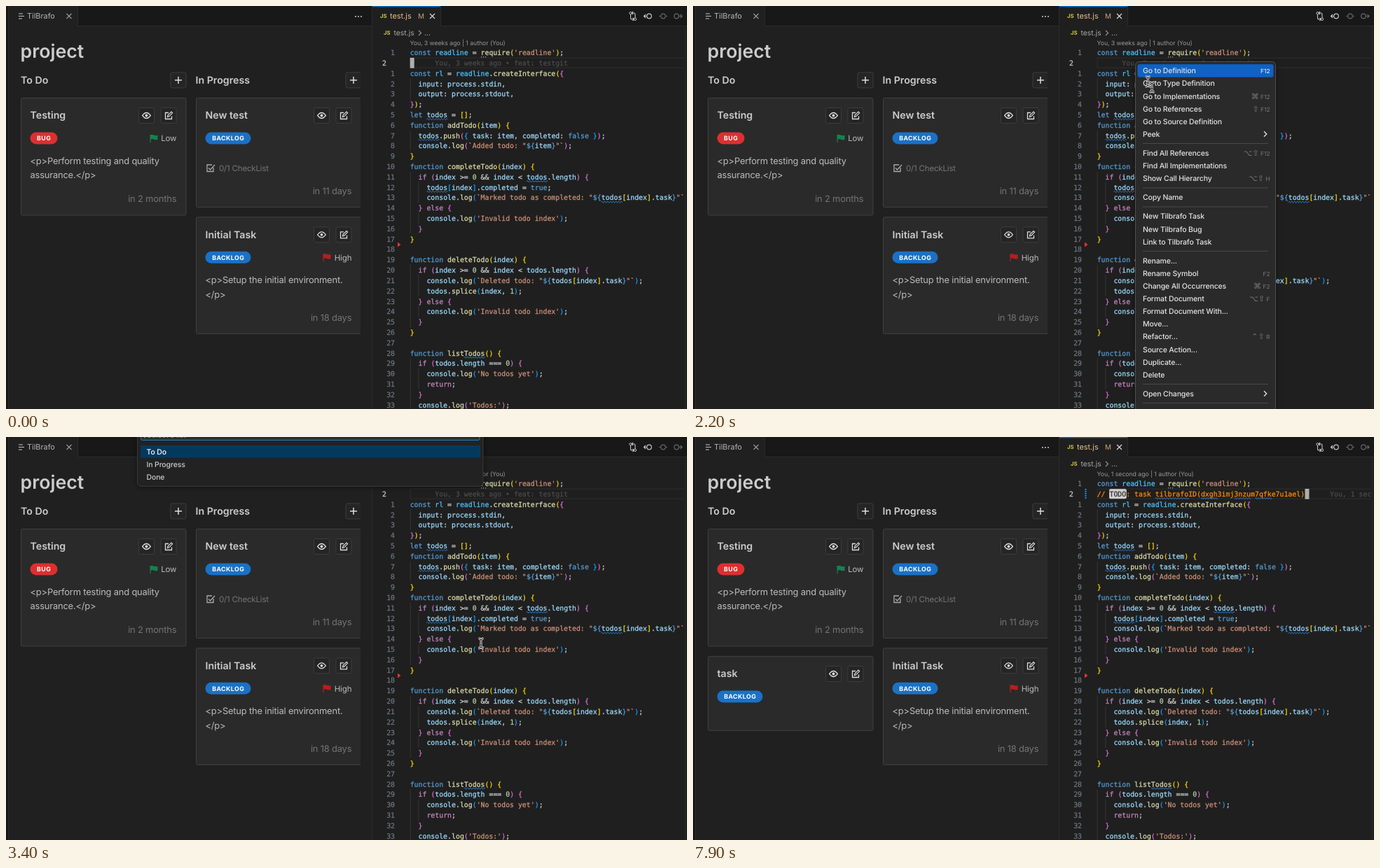
An HTML page for the animation above (8000 ms loop, 972x576 px).

```html
<!DOCTYPE html>
<html lang="en">
<head>
<meta charset="utf-8">
<title>Task board and editor</title>
<style>
html, body { margin: 0; width: 100%; height: 100%; overflow: hidden; background: #1f1f1f; }
svg { display: block; width: 972px; height: 576px; font-family: Inter, "Open Sans", sans-serif; text-rendering: geometricPrecision; }
.mono { font-family: "DejaVu Sans Mono", "Liberation Mono", monospace; font-variant-ligatures: none; }
.keys { font-family: Inter, "DejaVu Sans", sans-serif; }
.keys tspan { font-family: "DejaVu Sans", sans-serif; font-size: 11px; }
</style>
</head>
<body>
<svg id="stage" viewBox="0 0 972 576"></svg>
<script type="text/plain" id="code">const readline = require('readline');

const rl = readline.createInterface({
  input: process.stdin,
  output: process.stdout,
});
let todos = [];
function addTodo(item) {
  todos.push({ task: item, completed: false });
  console.log(`Added todo: "${item}"`);
}
function completeTodo(index) {
  if (index >= 0 && index < todos.length) {
    todos[index].completed = true;
    console.log(`Marked todo as completed: "${todos[index].task}"`);
  } else {
    console.log('Invalid todo index');
  }
}

function deleteTodo(index) {
  if (index >= 0 && index < todos.length) {
    console.log(`Deleted todo: "${todos[index].task}"`);
    todos.splice(index, 1);
  } else {
    console.log('Invalid todo index');
  }
}

function listTodos() {
  if (todos.length === 0) {
    console.log('No todos yet');
    return;
  }
  console.log('Todos:');</script>
<script>
const DUR = 8000;
const AT = { menu: 1400, menuEnd: 3000, picker: 3200, input: 4600, type: 6100, close: 7000, insert: 7100, card: 7300 };
const APP = 'TilBrafo', App = 'Tilbrafo';
const X0 = 576.7, CW = 5.935, LH = 14.81, BASE = 70.1;
const col = c => X0 + c * CW;
const row = r => BASE + r * LH;

const esc = s => s.replace(/&/g, '&amp;').replace(/</g, '&lt;');
const text = (x, y, s, size, fill, more = '') =>
  `<text x="${x}" y="${y}" font-size="${size}" fill="${fill}" ${more}>${esc(s)}</text>`;
const rect = (x, y, w, h, fill, more = '') =>
  `<rect x="${x}" y="${y}" width="${w}" height="${h}" fill="${fill}" ${more}/>`;
const line = (d, color, width = 1, more = '') =>
  `<path d="${d}" fill="none" stroke="${color}" stroke-width="${width}" ${more}/>`;
const group = (id, body) => `<g id="${id}">${body}</g>`;
const mono = (x, y, s, fill, more = '') =>
  text(x, y, s, 9.86, fill, `class="mono" stroke="${fill}" stroke-width=".25" xml:space="preserve" ${more}`);
const ui = (x, y, s, fill, more = '') =>
  text(x, y, s, 10.5, fill, `font-weight="500" letter-spacing="-.14" ${more}`);
const cross = (x, y, color) => line(`M${x - 3.5} ${y - 3.5}l7 7m0 -7l-7 7`, color, 1.1);
const END = 'text-anchor="end"', BOLD = 'font-weight="600"';

// ---- board ----
function iconButton(x, y, icon) {
  return rect(x + .5, y + .5, 22, 22, '#252525', 'rx="2" stroke="#3c3c3c"') +
    `<g transform="translate(${x + 11.5} ${y + 11.5})">${icon}</g>`;
}
const plus = line('M-5 0h10M0 -5v10', '#ddd', 1.5);
const eye = line('M-5.8 0Q0 -8 5.8 0Q0 8 -5.8 0Z', '#ddd', 1.3) + '<circle r="1.9" fill="#ddd"/>';
const pen = line('M0 -4H-4.5V5H4.5V1', '#ddd', 1.3) +
  line('M-1.5 2l.6 -2.4L4 -5.3l1.6 1.6L.8 1.3Z', '#ddd', 1.2);

function pill(x, y, s, w, color) {
  return rect(x, y, w, 17, color, 'rx="8.5"') +
    text(x + w / 2 + .2, y + 11.7, s, 8.8, '#fff', 'font-weight="700" letter-spacing=".45" text-anchor="middle"');
}
function card(x, y, h, title, o) {
  const body = (s, i) => text(x + 13.5, y + 94.8 + i * 20.5, s, 12.9, '#bcbcbc', 'letter-spacing="-.18"');
  let s = rect(x + .5, y + .5, 235.5, h - 1, '#2a2a2a', 'rx="2" stroke="#404040"') +
    text(x + 13.5, y + 30.2, title, 14.2, '#cccccc', BOLD) +
    iconButton(x + 168, y + 14, eye) + iconButton(x + 199.5, y + 14, pen) +
    (o.bug ? pill(x + 13.5, y + 49.5, 'BUG', 39, '#dc3030') : pill(x + 13.5, y + 49.5, 'BACKLOG', 65, '#1b71c4'));
  if (o.level) {
    s += text(x + 222.3, y + 62.4, o.level, 11.5, '#bcbcbc', `letter-spacing="-.15" ${END}`);
    const fx = o.level === 'Low' ? x + 184.5 : x + 181.5;
    s += `<path d="M${fx} ${y + 53}h5l.8 1h5.2v6.3h-5l-.8 -1h-4v4.7h-1.2z" fill="${o.flag}"/>`;
  }
  if (o.check) {
    s += line(`M${x + 25} ${y + 100}v5.5h-9v-9.5h7m-5 4.5l2.5 2.5l6.5 -7`, '#aaa', 1.3) +
      text(x + 33, y + 105.2, o.check, 11.5, '#757575', 'letter-spacing="-.18"');
  }
  (o.body || []).forEach((b, i) => s += body(b, i));
  if (o.due) s += text(x + 222.3, y + h - 19.5, o.due, 12.9, '#747474', `letter-spacing="-.18" ${END}`);
  return s;
}

function board() {
  return rect(0, 0, 523, 576, '#202020') + rect(0, 0, 523, 28, '#181818') + rect(0, 0, 3.5, 576, '#181818') +
    rect(4, 0, 98, 29, '#202020') +
    line('M3.5 0V576M102.5 0V28.5H523', '#2b2b2b') +
    line('M18 11h6M18 14.5h8M18 18h5', '#c5c5c5', 1.2) +
    text(30, 18, APP, 10.9, '#b4b4b4') + cross(90, 14.5, '#9a9a9a') +
    [499, 503, 507].map(x => `<circle cx="${x}" cy="15" r="1" fill="#ccc"/>`).join('') +
    text(20.5, 74, 'project', 26.7, '#cccccc', BOLD) +
    text(21, 111, 'To Do', 14.2, '#cccccc', BOLD) + iconButton(234.5, 94.5, plus) +
    text(270.5, 111, 'In Progress', 14.2, '#cccccc', BOLD) +
    card(21, 131, 168.5, 'Testing', { bug: 1, level: 'Low', flag: '#15824f',
      body: ['<p>Perform testing and quality', 'assurance.</p>'], due: 'in 2 months' }) +
    group('newCard', card(21, 313, 107, 'task', {})) +
    '<g clip-path="url(#boardClip)">' + iconButton(484.5, 94.5, plus) +
    card(271, 131, 157, 'New test', { check: '0/1 CheckList', due: 'in 11 days' }) +
    card(271, 301.3, 167.7, 'Initial Task', { level: 'High', flag: '#b81e1e',
      body: ['<p>Setup the initial environment.', '</p>'], due: 'in 18 days' }) + '</g>';
}

// ---- editor ----
const BRACKETS = ['#ffd700', '#da70d6', '#179fff'];
let depth = 0;
function tokenColor(tok, rest) {
  if (tok === '${' || (tok === '}' && rest.startsWith('"`'))) return '#569cd6';
  if (/^['`"]/.test(tok)) return '#ce9178';
  if (/^[([{]$/.test(tok)) return BRACKETS[depth++ % 3];
  if (/^[)\]}]$/.test(tok)) return BRACKETS[--depth % 3];
  if (/^(const|let|function|true|false)$/.test(tok)) return '#569cd6';
  if (/^(if|else|return)$/.test(tok)) return '#c586c0';
  if (/^\d/.test(tok)) return '#b5cea8';
  if (/^(readline|rl)$/.test(tok)) return '#4fc1ff';
  if (/^\w/.test(tok)) return rest[0] === '(' ? '#dcdcaa' : '#9cdcfe';
  return '#d4d4d4';
}
function codeLine(src, r) {
  const re = /'[^']*'|`[^$]*|"`|\$\{|\}(?="`)|\w+|[()[\]{}]|[^\w'`"$()[\]{}]+/g;
  let s = '', m;
  const indent = src.match(/^ */)[0].length;
  for (let c = 0; c < indent; c += 2) s += rect(col(c), row(r) - 11, .8, LH, '#3d3d3d');
  while ((m = re.exec(src))) {
    const tok = m[0], color = tokenColor(tok, src.slice(re.lastIndex));
    const lead = tok.match(/^ */)[0].length;
    if (tok.trim()) s += mono(col(m.index + lead), row(r), tok.trim(), color);
  }
  return s;
}
const squiggle = (r, c, n) =>
  line(`M${col(c)} ${row(r) + 2.8}q1 -1.8 2 0` + 't2 0'.repeat(Math.round(n * CW / 2) - 1), '#3794ff', .9);
const js = (x, y) => text(x, y, 'JS', 7.8, '#cbcb41', 'font-weight="700"');
const ring = (x, y, r, color, width = 1) =>
  `<circle cx="${x}" cy="${y}" r="${r}" fill="none" stroke="${color}" stroke-width="${width}"/>`;
const node = (x, color, d) => ring(x, 14.5, 3.3, color, 1.2) + line(d, color, 1.2);

function editor() {
  const rows = document.getElementById('code').textContent.split('\n');
  let s = rect(523, 0, 449, 576, '#1f1f1f') + rect(523, 0, 449, 28, '#181818') + rect(523, 0, 97, 29, '#1f1f1f') +
    line('M522.5 0V576M620.5 0V28.5H972', '#2b2b2b') + rect(523, 0, 97, 1.3, '#0078d4') +
    js(534, 17.3) + text(548, 18.2, 'test.js', 10.9, '#e2c08d') + text(588, 18, 'M', 10, '#c5a577') +
    cross(608.5, 14.5, '#ddd') +
    line('M891.5 12V17q0 2 2 2h3m-2 -2l2 2l-2 2M898 17V12q0 -2 -2 -2h-3m2 -2l-2 2l2 2', '#c5c5c5', 1.1) +
    ring(891.5, 10.3, 1.7, '#c5c5c5') + ring(898, 18.8, 1.7, '#c5c5c5') +
    node(918, '#c5c5c5', 'M914.5 14.5h-4m2.5 -2.5l-2.5 2.5l2.5 2.5') +
    node(938, '#666', 'M932 14.5h2.5m7 0h2.5') +
    node(957, '#666', 'M960.5 14.5h4.5m-2.5 -2.5l2.5 2.5l-2.5 2.5') +
    js(539, 41.2) + text(553.5, 42, 'test.js', 10.4, '#a8a8a8') +
    line('M589 35l3.5 3.5l-3.5 3.5', '#999', 1.1) + text(597, 42, '...', 10.4, '#a8a8a8') +
    '<text id="lens" x="576.5" y="56.2" font-size="8.7" fill="#999" letter-spacing="-.03"></text>';
  s += '<g clip-path="url(#codeClip)">' +
    rect(577, 74.3, 400, 14, 'none', 'stroke="#2b2b2b" stroke-width="1.3"');
  rows.forEach((src, r) => {
    s += codeLine(src, r);
    s += r === 1 ? mono(537, row(r), '2', '#cccccc')
      : mono(555, row(r), String(r ? r - 1 : 1), '#6e7681', END);
  });
  [[6, 4], [8, 2], [12, 28], [13, 4], [14, 46], [29, 13]].forEach(([r, c]) => s += squiggle(r, c, 5));
  s += [0, 3, 6].map(d => rect(678 + d, 72.3, 1.2, 1.2, '#aaa')).join('') +
    '<path d="M559 337.5l4.5 3.5l-4.5 3.5z" fill="#e5352b"/>' +
    group('oldBlame', mono(col(6), row(1), 'You, 3 weeks ago • feat: testgit', '#4b4b4b')) +
    group('note',
      mono(col(0), row(1), '//', '#ff8c00') + rect(col(3) - .5, 74.3, 4 * CW + 1, 14, '#d0d0d0', 'rx="2"') +
      mono(col(3), row(1), 'TODO', '#333') +
      mono(col(7), row(1), `: task ${App.toLowerCase()}ID(dxgh3imj3nzum7qfke7u1ael)`, '#ff8c00') +
      [[14, 8], [25, 4], [33, 4], [38, 4]].map(([c, n]) => squiggle(1, c, n)).join('') +
      line('M560.5 74V89', '#2090d3', 2, 'stroke-dasharray="2 1"') +
      mono(col(56), row(1), 'You, 1 second ago • Uncommitted changes', '#4b4b4b')) +
    rect(X0, 74, 6, 14.8, '#aeafad', 'id="block"') + '</g>' + line('M969.5 29V576', '#272727');
  return s;
}

// ---- context menu ----
const ITEMS = [
  ['Go to Definition', 'F12'], ['Go to Type Definition'], ['Go to Implementations', '⌘ F12'],
  ['Go to References', '⇧ F12'], ['Go to Source Definition'], ['Peek', '>'], null,
  ['Find All References', '⌥⇧ F12'], ['Find All Implementations'], ['Show Call Hierarchy', '⌥⇧ H'], null,
  ['Copy Name'], null,
  [`New ${App} Task`], [`New ${App} Bug`], [`Link to ${App} Task`], null,
  ['Rename...'], ['Rename Symbol', 'F2'], ['Change All Occurrences', '⌘ F2'], ['Format Document', '⌥⇧ F'],
  ['Format Document With...'], ['Move...'], ['Refactor...', '⌃⇧ R'], ['Source Action...'], ['Duplicate...'],
  ['Delete'], null, ['Open Changes', '>'], null
];
const KEY_COLOR = '#7a7a7a';
const itemY = [];
const shortcut = (y, key, id) =>
  `<text ${id} class="keys" x="823.5" y="${y}" font-size="8.4" fill="${KEY_COLOR}" ${END}>` +
  key.replace(/[⌘⇧⌥⌃]+/, '<tspan>$&</tspan>') + '</text>';

function menu() {
  let y = 92.5, s = rect(631.5, 79.5, 200, 520, '#2a2a2a', 'rx="5" stroke="#505050" filter="url(#shadow)"') +
    rect(634.5, 0, 194, 18.6, '#0f62c4', 'id="hover" rx="3"');
  for (const item of ITEMS) {
    if (!item) {
      s += line(`M642 ${y - 4.6}H821`, '#4a4a4a');
      y += 9.05;
      continue;
    }
    const [label, key] = item;
    itemY.push(y);
    s += ui(642, y + 3.8, label, '#e4e4e4');
    if (key === '>') s += line(`M815 ${y - 3.7}l3.7 3.7l-3.7 3.7`, '#ddd', 1.4);
    else if (key) s += shortcut(y + 3.8, key, itemY.length === 1 ? 'id="firstKey"' : '');
    y += 18.1;
  }
  return s;
}

// ---- quick input ----
const panel = h => rect(187.5, -10, 493.5, h + 10, '#222222', 'rx="5" stroke="#3a3a3a" filter="url(#shadow)"') +
  rect(192.5, -16, 483.5, 20.5, '#2e2e2e', 'rx="2" stroke="#1f7fce"');
const picker = () => panel(70.5) + ui(201, .8, 'Select a list', '#8a8a8a') + rect(197.5, -12, 1, 13.5, '#ccc') +
  rect(192, 12, 485, 17.7, '#04395e') +
  ['To Do', 'In Progress', 'Done'].map((s, i) => ui(200.5, 24.6 + i * 18.2, s, i ? '#ccc' : '#fff')).join('');
const titleInput = () => panel(33.5) + ui(198, .9, '', '#ccc', 'id="typed"') + rect(198, -12, 1, 13.3, '#ccc', 'id="caret"') +
  ui(196.5, 19.8, "Please input the title (Press 'Enter' to confirm or 'Escape' to cancel)", '#cccccc');

const BEAM = 'M-3.5 -7q3.5 0 3.5 2.5q0 -2.5 3.5 -2.5M0 -4.5V4.5M-3.5 7q3.5 0 3.5 -2.5q0 2.5 3.5 2.5M-2 2h4';
const beam = id => group(id, line(BEAM, '#eee', 2.8) + line(BEAM, '#111', 1));

document.getElementById('stage').innerHTML = `<defs>
  <clipPath id="boardClip"><rect x="262" y="80" width="244" height="496"/></clipPath>
  <clipPath id="codeClip"><rect x="523" y="29" width="445" height="547"/></clipPath>
  <filter id="shadow" x="-10%" y="-10%" width="120%" height="130%" color-interpolation-filters="sRGB">
    <feDropShadow dx="0" dy="1" stdDeviation="3" flood-color="#000" flood-opacity=".5"/></filter>
  </defs>` + board() + editor() + group('menu', menu()) + group('picker', picker()) +
  group('title', titleInput()) + beam('trail') + beam('pointer');

// ---- motion ----
const el = {};
document.querySelectorAll('svg [id]').forEach(e => el[e.id] = e);
const show = (id, on) => el[id].setAttribute('display', on ? 'inline' : 'none');

const PATH = [[800, 690, 150], [1100, 632, 84], [2000, 632, 84], [2200, 655, 116], [2600, 678, 291], [3000, 678, 291], [3200, 678, 295]];
function pointerAt(t) {
  const i = PATH.findIndex(p => p[0] > t);
  if (i < 0) return PATH[PATH.length - 1].slice(1);
  if (i === 0) return PATH[0].slice(1);
  const [ta, xa, ya] = PATH[i - 1], [tb, xb, yb] = PATH[i], k = (t - ta) / (tb - ta);
  return [xa + (xb - xa) * k, ya + (yb - ya) * k];
}
const place = (id, [x, y]) => el[id].setAttribute('transform', `translate(${x} ${y})`);

function draw(now) {
  const t = Math.floor(now % DUR / 100) * 100;
  const within = (a, b) => t >= a && t < b;
  const noted = t >= AT.insert;

  show('menu', within(AT.menu, AT.menuEnd));
  show('picker', within(AT.picker, AT.input));
  show('title', within(AT.input, AT.close));
  show('newCard', t >= AT.card);
  show('note', noted);
  show('oldBlame', !noted);
  show('block', t < AT.menu || t >= AT.close);
  el.block.setAttribute('x', noted ? col(50) : X0);
  el.lens.textContent = `You, ${noted ? '1 second' : '3 weeks'} ago | 1 author (You)`;

  // The hovered row lags slightly behind the pointer.
  const [hx, hy] = pointerAt(t - 150);
  const hit = itemY.reduce((a, b) => Math.abs(b - hy) < Math.abs(a - hy) ? b : a);
  el.hover.setAttribute('y', hit - 9.3);
  show('hover', hx > 635);
  el.firstKey.setAttribute('fill', hx > 635 && hit === itemY[0] ? '#fff' : KEY_COLOR);

  const typed = t < AT.type ? '' : 'task'.slice(0, (t - AT.type) / 100 + 1);
  el.typed.textContent = typed;
  el.caret.setAttribute('x', 198 + (typed ? el.typed.getComputedTextLength() : 0));
  show('caret', typed || Math.floor((t - AT.input) / 500) % 2 === 0);

  const p = pointerAt(t), q = pointerAt(t - 50);
  const seen = within(PATH[0][0], AT.type);
  show('pointer', seen);
  show('trail', seen && Math.hypot(p[0] - q[0], p[1] - q[1]) > 4);
  place('pointer', p);
  place('trail', q);
}
function tick(now) {
  draw(now);
  requestAnimationFrame(tick);
}
draw(0);
requestAnimationFrame(tick);
</script>
</body>
</html>
```
